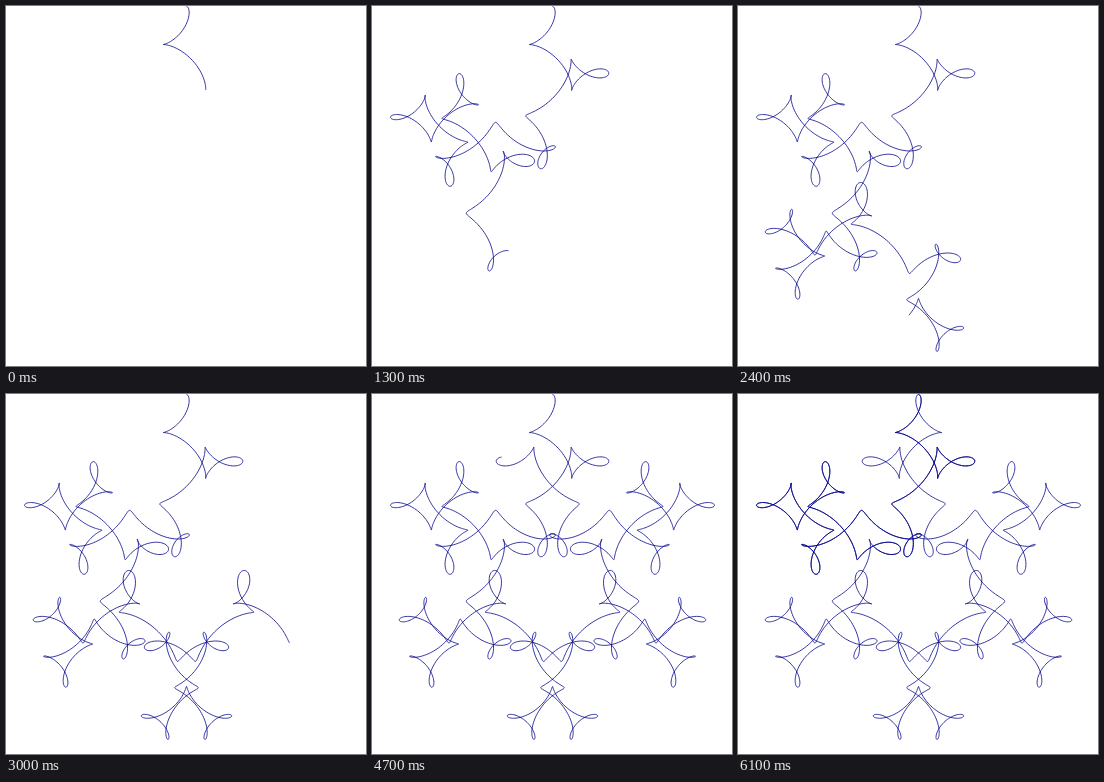
Write an HTML page with a canvas that moves like this. It is 360 px wide and 360 px high and loops after 6200 ms.

```html
<!DOCTYPE html>
<html>
<head>
<meta charset="utf-8">
<style>
html, body { margin: 0; width: 100%; height: 100%; overflow: hidden; background: #fff; }
canvas { display: block; }
</style>
</head>
<body>
<canvas id="stage" width="360" height="360"></canvas>
<script>
const ctx = document.getElementById('stage').getContext('2d');
const CENTER = 180.5, RADIUS = 97.3;
const LOOP_MS = 6200, STEP_MS = 100;
const FIRST_ANGLE = 9, STEP_ANGLE = 7.2, RESOLUTION = 0.1; // degrees

// Four circles rolling on one another; negative speeds turn clockwise.
const wheels = [
  { speed: 1, size: 1 },
  { speed: -5, size: 1 / 2 },
  { speed: 20, size: 1 / 4 },
  { speed: -60, size: 1 / 10 }
];

function pointAt(degrees) {
  const t = degrees * Math.PI / 180;
  let x = CENTER, y = CENTER;
  for (const { speed, size } of wheels) {
    x -= RADIUS * size * Math.sin(speed * t);
    y -= RADIUS * size * Math.cos(speed * t);
  }
  return [x, y];
}

function trace(end) {
  ctx.beginPath();
  for (let a = 0; a < end; a += RESOLUTION) ctx.lineTo(...pointAt(a));
  ctx.lineTo(...pointAt(end));
  ctx.stroke();
}

ctx.strokeStyle = '#00008b';
ctx.lineWidth = 0.8;
ctx.lineJoin = 'round';

function draw(now) {
  const step = Math.floor((now % LOOP_MS) / STEP_MS);
  const angle = FIRST_ANGLE + step * STEP_ANGLE;
  ctx.clearRect(0, 0, 360, 360);
  trace(Math.min(angle, 360));
  if (angle > 360) trace(angle - 360); // the second turn darkens the line
}

const start = performance.now();
function tick() {
  draw(performance.now() - start);
  requestAnimationFrame(tick);
}
tick();
</script>
</body>
</html>
```
